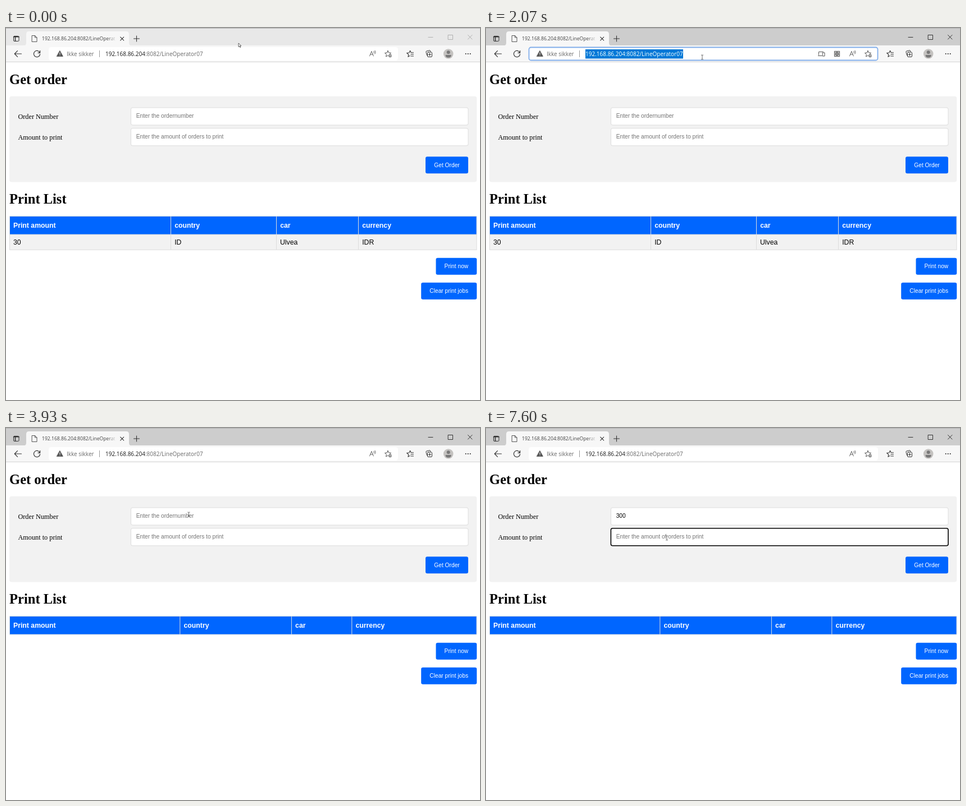
Animation of 844 by 663 pixels, one loop 8 s. Source, as an HTML page:

```html
<!DOCTYPE html>
<html lang="en">
<head>
<meta charset="utf-8">
<title>Print list</title>
<style>
  html, body { margin: 0; width: 100%; height: 100%; overflow: hidden; background: #fff; }
  svg { display: block; width: 844px; height: 663px; }
  text { white-space: pre; }
  .ui { font: 10px "Open Sans", "Noto Sans", sans-serif; fill: #6b6b6b; }
  .tab { font-size: 8.58px; fill: #444; }
  .host { fill: #1a1a1a; }
  .h { font: bold 24.53px "Liberation Serif", serif; }
  .label { font: 12.27px "Liberation Serif", serif; }
  .in { font: 10.22px "Liberation Sans", sans-serif; }
  .ph { fill: #757575; }
  .btn { font: 10.22px "Liberation Sans", sans-serif; fill: #fff; text-anchor: middle; }
  .th { font: bold 12.27px "Liberation Sans", sans-serif; fill: #fff; }
  .td { font: 12.27px "Liberation Sans", sans-serif; }
  .ico { fill: none; stroke: #333; stroke-width: 1; stroke-linecap: round; stroke-linejoin: round; }
</style>
</head>
<body>
<svg viewBox="0 0 844 663">
  <defs>
    <linearGradient id="fade">
      <stop offset="0" stop-color="#f7f7f7" stop-opacity="0"/>
      <stop offset="1" stop-color="#f7f7f7"/>
    </linearGradient>
    <path id="star" d="M0-5.5 1.6-1.9 5.5-1.5 2.6 1.2 3.4 5 0 3-3.4 5-2.6 1.2-5.5-1.5-1.6-1.9Z"/>
  </defs>
  <rect width="844" height="663" fill="#fff"/>

  <!-- tab strip -->
  <rect id="strip" width="844" height="32"/>
  <rect width="844" height="1" fill="#b4b4b4"/>
  <rect y="31" width="844" height="29" fill="#f7f7f7"/>
  <rect y="60" width="844" height="1" fill="#d4d4d4"/>
  <path d="M31 31.5q5 0 5-5V11q0-5 5-5h173q5 0 5 5v15.5q0 5 5 5z" fill="#f7f7f7"/>
  <g class="ico">
    <rect x="13.5" y="14.5" width="9.5" height="9" rx="1.5"/>
    <path d="M13.5 15.7h9.5M16.5 16v7" stroke-width="1.5"/>
    <path d="M46.5 13.5h5l3.5 3.5v7.5h-8.5zM51.5 13.5v3.5h3.5" stroke="#555"/>
    <path d="M203.7 16.2l6 6m0-6l-6 6M227.5 19h10M232.5 14v10" stroke-width="1.1"/>
    <path id="winBtns" d="M752 16.5h8M787.5 12.5h8v8h-8zM822.5 12.5l7.5 7.5m0-7.5l-7.5 7.5" stroke-width=".9"/>
  </g>
  <text class="ui tab" x="64" y="22.2">192.168.86.204:8082/LineOperat</text>
  <rect x="180" y="12" width="17" height="14" fill="url(#fade)"/>

  <!-- toolbar -->
  <rect id="bar" x="76.5" y="34.5" width="621" height="23" rx="3.5" fill="#fff"/>
  <g class="ico">
    <path d="M27.5 46H15.5M20.5 40.7L15.3 46l5.2 5.3" stroke-width="1.2"/>
    <path d="M60.3 44.2A5.6 5.6 0 1 0 60.6 46.6M60.6 40.6v3.7h-3.7" stroke-width="1.2"/>
    <path d="M96 40.8l5.3 9.7H90.7z" fill="#555" stroke="#555"/>
    <path d="M96 44v3M96 49v.1" stroke="#fff"/>
    <path d="M647.5 50l3.4-8.5 3.4 8.5M648.7 47h4.5M655 41.5q1.3 1.5 0 3.3M657 40.3q2.2 2.7 0 5.8" stroke="#555" stroke-width=".9"/>
    <use href="#star" x="680" y="46" stroke="#555"/>
    <circle cx="684" cy="49.5" r="3" fill="#555" stroke="#fff" stroke-width=".6"/>
    <path d="M682.5 49.5h3M684 48v3" stroke="#fff" stroke-width=".8"/>
    <path d="M721 43.4l-1.4-3-1.7 3.6-4.2.5 3.1 2.8-.8 4 3.2-1.9M721.5 43.7h4M721 46.8h4.5M721 50h4.5" stroke-width="1.1"/>
    <path d="M749.5 48.5l-1.6-5.8q-.3-1.2.9-1.5l5.2-1.3q1.2-.2 1.5.9l.3 1.2"/>
    <rect x="750.5" y="43" width="8" height="8.5" rx="1.5"/>
    <path d="M754.5 45v4.5M752.3 47.2h4.4"/>
  </g>
  <circle cx="787.7" cy="46" r="8.8" fill="#c4c2c0"/>
  <circle cx="787.7" cy="43.2" r="3" fill="#777"/>
  <path d="M782.7 48h10q.5 4.7-5 4.7t-5-4.7z" fill="#777"/>
  <g fill="#222"><circle cx="818.7" cy="46" r="1"/><circle cx="822.7" cy="46" r="1"/><circle cx="826.7" cy="46" r="1"/></g>
  <g id="tools" class="ico" stroke-width=".9">
    <path d="M592.5 48v-5.5h8M591.5 49.5h6.5" stroke="#555"/>
    <rect x="599.5" y="44" width="3.5" height="6" stroke="#555"/>
    <path d="M620.5 41.5h3v3h-3zM626.5 41.5h3v3h-3zM620.5 47.5h3v3h-3zM626.5 47.5h3v3h-3zM625 41v10M620 46h10" stroke="#555" stroke-width="1.1"/>
  </g>
  <g id="chip">
    <text class="ui" x="108" y="49.6">Ikke sikker</text>
    <rect x="166" y="40" width="1" height="12" fill="#999"/>
  </g>
  <rect id="sel" x="177" y="38" width="174" height="16.5" fill="#0078d7"/>
  <text id="url" class="ui" y="49.6"><tspan id="host" class="host">192.168.86.204</tspan><tspan id="path">:8082/LineOperator07</tspan></text>
  <rect id="urlCaret" y="40" width="1" height="12" fill="#111"/>

  <!-- form -->
  <text class="h" x="6.1" y="100">Get order</text>
  <rect x="6" y="121.8" width="832.3" height="152.8" rx="4" fill="#f2f2f2"/>
  <text class="label" x="21.4" y="161.8">Order Number</text>
  <text class="label" x="21.4" y="198.7">Amount to print</text>
  <rect id="box1" x="222.4" y="142" width="600.6" height="31" rx="3" fill="#fff"/>
  <rect id="box2" x="222.4" y="178.8" width="600.6" height="31" rx="3" fill="#fff"/>
  <text id="val1" class="in" x="231.7" y="160.4"></text>
  <text class="in ph" x="231.7" y="197.4">Enter the amount of orders to print</text>
  <rect id="caret" width="1" height="12" fill="#000"/>
  <rect x="747" y="229.3" width="76" height="30" rx="3.2" fill="#06f"/>
  <text class="btn" x="785" y="247.7">Get Order</text>

  <!-- list -->
  <text class="h" x="6.1" y="313.3">Print List</text>
  <g id="row">
    <rect x="6.5" y="368" width="831.5" height="27.3" fill="#f2f2f2" stroke="#ddd"/>
    <text class="td" x="13" y="386">30</text>
    <text class="td" x="300.2" y="386">ID</text>
    <text class="td" x="488" y="386">Ulvea</text>
    <text class="td" x="634.2" y="386">IDR</text>
  </g>
  <rect x="6.5" y="335.5" width="831.5" height="32.5" fill="#06f" stroke="#ddd" stroke-width=".9"/>
  <path id="cols" stroke="#ddd"/>
  <text class="th" x="13" y="356">Print amount</text>
  <text id="c0" class="th" y="356">country</text>
  <text id="c1" class="th" y="356">car</text>
  <text id="c2" class="th" y="356">currency</text>
  <g id="actions">
    <rect x="765.5" y="409.8" width="72.8" height="30" rx="3.2" fill="#06f"/>
    <text class="btn" x="801.9" y="428.2">Print now</text>
    <rect x="739.2" y="453.8" width="99.1" height="30" rx="3.2" fill="#06f"/>
    <text class="btn" x="788.7" y="472.2">Clear print jobs</text>
  </g>

  <g id="mouse">
    <path id="arrow" d="M0 0v6.6l1.6-1.4 1.2 2.5 1-.5-1.1-2.4h2.2z" fill="#fff" stroke="#222" stroke-width=".7"/>
    <path id="beam" d="M-2-3.8h1.4l.6.5.6-.5h1.4M0-3.4v6.8M-2 3.8h1.4l.6-.5.6.5h1.4" fill="none" stroke="#444" stroke-width=".8"/>
  </g>
</svg>
<script>
const LOOP = 8000, FPS = 15;
const $ = id => document.getElementById(id);
const set = (id, o) => { for (const n in o) $(id).setAttribute(n, o[n]); };
const show = (id, on) => set(id, { visibility: on ? "visible" : "hidden" });
const within = (v, a, b) => v >= a && v < b;

// pointer stops: tick, x, y
const stops = [
  [0, 414, 27], [2, 414, 27], [9, 340, 174], [11, 342, 166], [12, 342, 166],
  [13, 342, 165], [19, 342, 165], [20, 342, 164], [21, 342, 164], [26, 376, 60.5],
  [28, 376, 60.5], [29, 382, 53], [30, 385, 52], [36, 385, 52], [38, 377, 46],
  [39, 377, 46], [41, 375, 46], [49, 375, 46], [59, 324, 157], [63, 324, 157],
  [64, 324.5, 157], [69, 324.5, 157], [70, 326, 157], [98, 326, 157], [108, 322, 196], [120, 322, 196]
];

function pointer(k) {
  const i = stops.findIndex((s, n) => n && k <= s[0]);
  const [a, ax, ay] = stops[i - 1], [b, bx, by] = stops[i];
  const p = (k - a) / (b - a), e = p * p * (3 - 2 * p);
  return [ax + (bx - ax) * e, ay + (by - ay) * e];
}

function browser(k, overBar) {
  const active = k >= 31, focus = within(k, 31, 46), sel = within(k, 31, 40);
  set("strip", { fill: active ? "#cdcdcd" : "#e8e8e8" });
  $("winBtns").style.stroke = active ? "#222" : "#aaa";
  const hover = overBar && (k < 31 || k > 49);
  set("bar", { stroke: focus ? "#82aeea" : hover ? "#c8c8c8" : "#fff", "stroke-width": focus ? 1.8 : 1 });
  show("tools", focus);
  show("sel", sel);
  show("chip", k !== 46);
  set("url", { x: k === 46 ? 114.3 : 177 });
  $("host").style.fill = sel ? "#fff" : "";
  $("path").style.fill = sel ? "#fff" : focus ? "#1a1a1a" : "";
  show("urlCaret", within(k, 40, 47));
  set("urlCaret", { x: k === 46 ? 116 : 351.5 });
}

function form(k) {
  const field = k < 60 ? 0 : k < 106 ? 1 : 2;
  for (const n of [1, 2]) {
    const on = field === n;
    set("box" + n, { stroke: on ? "#000" : "#dcdcdc", "stroke-width": on ? 1.6 : 1 });
  }
  const typed = "300".slice(0, (k >= 88) + (k >= 91) + (k >= 93));
  $("val1").textContent = typed || "Enter the ordernumber";
  set("val1", { class: typed ? "in" : "in ph" });
  show("caret", within(k, 60, 68) || within(k, 76, 83) || within(k, 88, 101) || within(k, 106, 114));
  set("caret", { x: 231.5 + (field === 1 ? typed.length * 5.68 : 0), y: field === 2 ? 188 : 151 });
}

function list(k) {
  const full = k < 46, xs = full ? [293.5, 481.5, 627.5] : [309.8, 508.4, 615.8];
  show("row", full);
  set("cols", { d: xs.map(x => `M${x} 335.5V${full ? 395 : 368}`).join("") });
  xs.forEach((x, i) => set("c" + i, { x: x + 6.7 }));
  set("actions", { transform: `translate(0 ${full ? 0 : -27})` });
}

function draw(ms) {
  const k = Math.floor((ms % LOOP) * FPS / 1000 + 0.02);
  const [x, y] = pointer(k);
  const overBar = within(y, 34, 58);
  const beam = overBar || within(y, 142, 173.5) || within(y, 178.5, 210);
  set("mouse", { transform: `translate(${x} ${y})` });
  show("arrow", !beam);
  show("beam", beam);
  browser(k, overBar);
  form(k);
  list(k);
}

const start = performance.now();
function tick(now) {
  draw(Math.max(0, now - start));
  requestAnimationFrame(tick);
}
draw(0);
requestAnimationFrame(tick);
</script>
</body>
</html>
```
